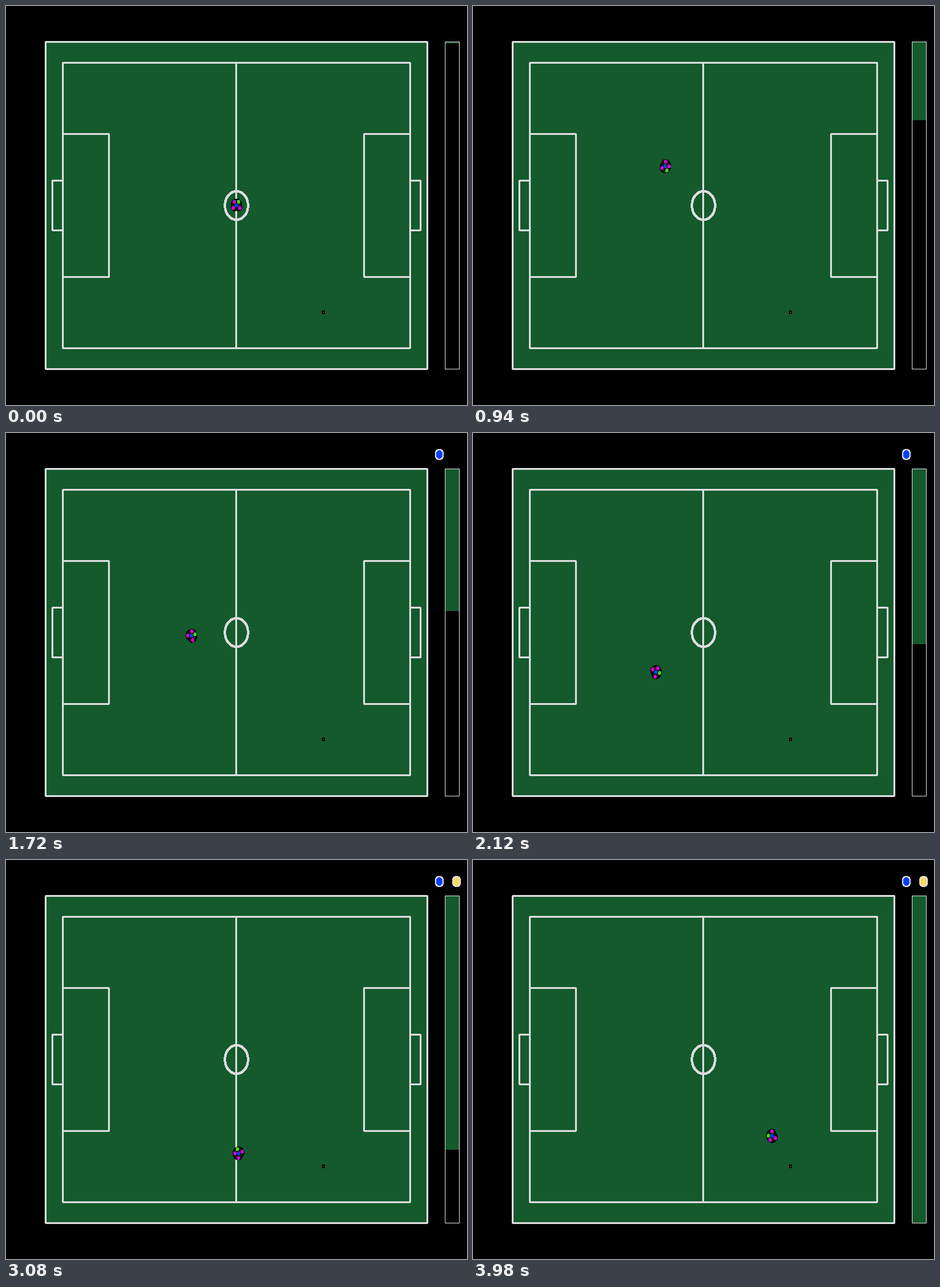
Recreate the animation shown at these times as a matplotlib script. Size 750 by 650 pixels, loop 4030 ms.

```python
import numpy as np
import matplotlib.pyplot as plt
from matplotlib.animation import FuncAnimation
from matplotlib.patches import Ellipse, Polygon, Rectangle

W, H, DPI = 750, 650, 100
PX = 72 / DPI
STEPS, TICK = 200, 10            # pose count, ms per tick
TICKS = 2 * STEPS + 3            # two ticks per pose, the last pose holds longer

GREEN, LINE, DARK = "#145a2d", "#dcdcdc", "#191919"
BLUE, YELLOW, ORANGE = "#0040ff", "#fada5e", "#fd6a02"
PINK, LIME = "#dc00dc", "#39dc14"

SX, SY = 94.15, 116.05           # pixels per metre
RADIUS, FRONT, TAG_DIST = 0.09, 0.073, 0.065

# step, x, y in pixels, heading in degrees
KEYS = np.array([
    (0, 375, 325, -90), (29, 331.5, 281.5, 44), (48, 312.4, 261, 150),
    (66, 313, 280, 217), (106, 297.5, 389.5, 203), (134, 333.5, 452.5, 120),
    (154, 378.5, 478, -35), (162, 406, 480.5, -50), (186, 465.5, 443.2, 5),
    (199, 486.5, 449.5, 31)])


def smooth(t, v):
    """Cubic Hermite curve through the keys, starting at rest."""
    n = np.arange(STEPS)
    slope = np.gradient(v, t, edge_order=2)
    slope[0] = 0
    i = np.clip(np.searchsorted(t, n, "right") - 1, 0, len(t) - 2)
    h = t[i + 1] - t[i]
    u = (n - t[i]) / h
    return ((1 + 2 * u) * (1 - u) ** 2 * v[i] + u * (1 - u) ** 2 * h * slope[i]
            + u * u * (3 - 2 * u) * v[i + 1] + u * u * (u - 1) * h * slope[i + 1])


X, Y, TURN = (smooth(KEYS[:, 0], column) for column in KEYS.T[1:])
TURN = np.radians(TURN)

fig = plt.figure(figsize=(W / DPI, H / DPI), dpi=DPI, facecolor="black")
ax = fig.add_axes([0, 0, 1, 1])
ax.set(xlim=(0, W), ylim=(H, 0))
ax.axis("off")


def box(x0, y0, x1, y1, width=3, fill="none"):
    ax.add_patch(Rectangle((x0, y0), x1 - x0, y1 - y0, fc=fill, ec=LINE,
                           lw=width * PX, joinstyle="bevel", snap=True))


def field_box(x0, y0, x1, y1, **style):
    cx, cy = 374.45, 324.5
    box(cx + x0 * SX, cy + y0 * SY, cx + x1 * SX, cy + y1 * SY, **style)


def oval(x, y, rx, ry, fill, edge="none", width=0):
    return ax.add_patch(Ellipse((x, y), 2 * rx, 2 * ry, fc=fill, ec=edge,
                                lw=width * PX, antialiased=False))


# pitch
field_box(-3.3, -2.3, 3.3, 2.3, fill=GREEN)
field_box(-3, -2, 3, 2)
field_box(0, -2, 0, 2)
for side in (-1, 1):
    field_box(side * 3, -1, side * 2.2, 1)
    field_box(side * 3, -0.35, side * 3.18, 0.35)
oval(375, 325, 0.2 * SX, 0.2 * SY, "none", LINE, 2.8)

# progress bar and lamps
bar = ax.add_patch(Rectangle((714, 58), 24, 0, fc=GREEN, lw=0))
box(714, 58, 737, 591, width=1)
blue = oval(705, 35, 6.5, 8.2, BLUE, LINE, 1)
yellow = oval(733, 35, 6.5, 8.2, YELLOW, LINE, 1)

# ball
oval(516.5, 499, 1.9, 2.4, ORANGE, "black", 1)


def polar(r, angles):
    return r * np.column_stack([np.cos(angles), np.sin(angles)])


# robot: round hull with a flat front, one tag in the middle and four around it
cut = np.arccos(FRONT / RADIUS)
HULL = polar(RADIUS, np.linspace(cut, 2 * np.pi - cut, 40))
TAGS = np.vstack([(0, 0), polar(TAG_DIST, np.radians([57.4, 147.4, -147.4, -57.4]))])
hull = ax.add_patch(Polygon(HULL, closed=True, fc=DARK, ec="black", lw=0.8 * PX,
                            antialiased=False))
tags = [oval(0, 0, 0.022 * SX, 0.022 * SY, color)
        for color in (BLUE, PINK, LIME, PINK, PINK)]


def place(points, n):
    """Turn robot coordinates into pixels for step n."""
    c, s = np.cos(TURN[n]), np.sin(TURN[n])
    px, py = points.T
    return np.column_stack([X[n] + SX * (c * px - s * py),
                            Y[n] - SY * (s * px + c * py)])


def draw(tick):
    n = min(tick // 2, STEPS - 1)
    hull.set_xy(place(HULL, n))
    for tag, pos in zip(tags, place(TAGS, n)):
        tag.set_center(pos)
    bar.set_height(np.ceil(533 * (n + 1) / STEPS))
    blue.set_visible(58 <= n < 107 or n >= 121)
    yellow.set_visible(n >= 145)
    return [hull, bar, blue, yellow, *tags]


anim = FuncAnimation(fig, draw, frames=TICKS, interval=TICK, repeat=True,
                     repeat_delay=0, init_func=lambda: draw(0))
plt.show()
```
